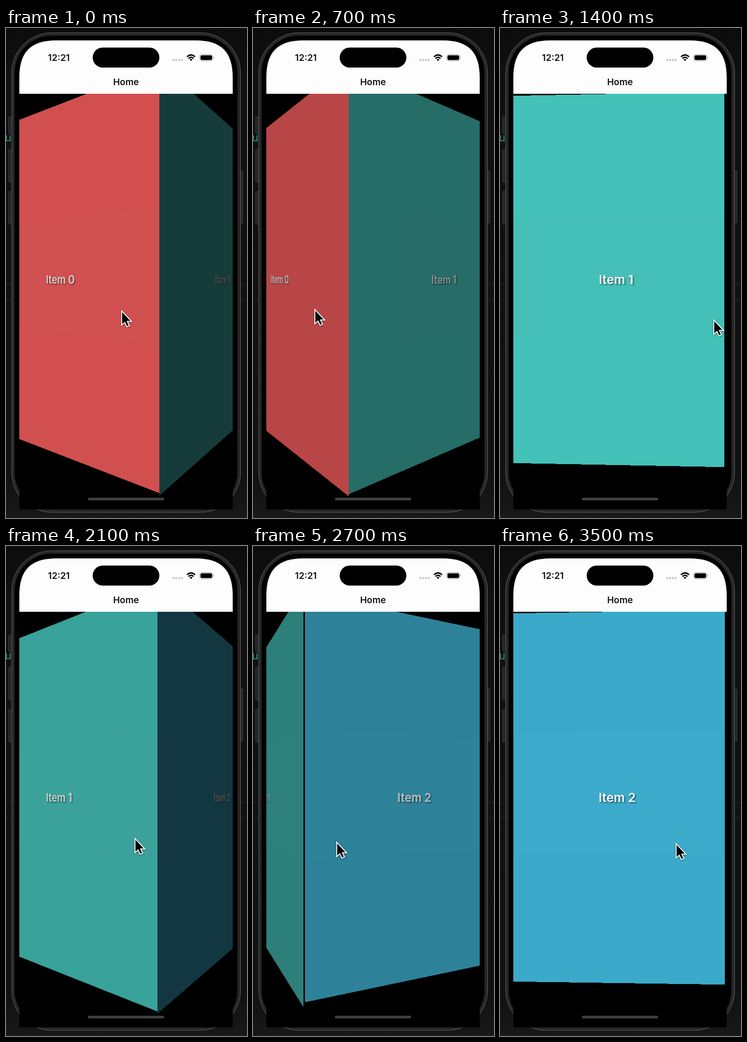
An HTML page that plays this animation: 506x1028 px, repeating every 3600 ms.

```html
<!DOCTYPE html>
<html lang="en">
<head>
<meta charset="utf-8">
<title>Rotating carousel</title>
<style>
  html, body { margin: 0; width: 100%; height: 100%; overflow: hidden; background: #101010; }
  #stage { position: relative; width: 506px; height: 1028px; overflow: hidden; font-family: Inter, sans-serif; }
  svg { position: absolute; left: 0; top: 0; }
  #view {
    position: absolute; left: 28px; top: 137.5px; width: 448px; height: 872px;
    overflow: hidden; background: #000;
    perspective: 448px; perspective-origin: 224px 390px;
  }
  .panel {
    position: absolute; left: -0.4px; top: 0.5px; width: 448.8px; height: 779px;
    display: flex; align-items: center; justify-content: center;
    color: #fff; font-size: 26px; font-weight: 600;
    text-shadow: 2px 2px 3px rgba(0, 0, 0, .55);
  }
</style>
</head>
<body>
<div id="stage">
  <svg width="506" height="1028">
    <defs>
      <linearGradient id="backdrop" x2="0" y2="1">
        <stop stop-color="#0c0c0c"/><stop offset=".1" stop-color="#101010"/>
        <stop offset=".9" stop-color="#111"/><stop offset="1" stop-color="#181818"/>
      </linearGradient>
    </defs>
    <rect width="506" height="1028" fill="url(#backdrop)"/>
    <path d="M0 538H506M0 570H506" stroke="#181818" stroke-width="4"/>
    <text x="-2" y="238" font-family="Roboto, sans-serif" font-size="24" fill="#2b8f84">u</text>
    <g fill="#252525" stroke="#3c3c3c">
      <rect x="5.5" y="186.5" width="12" height="35" rx="2"/>
      <rect x="5.5" y="254.5" width="12" height="69" rx="2"/>
      <rect x="5.5" y="342.5" width="12" height="69" rx="2"/>
      <rect x="486.5" y="299.5" width="11" height="110" rx="2"/>
    </g>
    <rect x="12" y="10" width="480.5" height="1006" rx="84" fill="#262626" stroke="#666"/>
    <rect x="18" y="16" width="468" height="994" rx="78" fill="#000"/>
    <path d="M28 138V104C28 50 52 26 106 26H398C452 26 476 50 476 104V138Z" fill="#fdfdfd"/>
    <rect x="182" y="41" width="140" height="42" rx="21"/>
    <g font-size="19" font-weight="600" text-anchor="middle" fill="#111">
      <text x="111" y="69">12:21</text>
      <text x="252" y="120">Home</text>
    </g>
    <path d="M349 67.3H371" stroke="#c6c6c6" stroke-width="4" stroke-dasharray="4 2"/>
    <g fill="none" stroke="#000" stroke-width="2.7">
      <path d="M380 60.5Q388.500 52.500 397 60.500M383.200 64Q388.500 59 393.800 64"/>
      <path d="M385.500 66.300Q388.500 63.800 391.500 66.300L388.500 69.200Z" fill="#000" stroke="none"/>
    </g>
    <rect x="406.500" y="55.500" width="28" height="13.500" rx="4.500" fill="none" stroke="#999"/>
    <rect x="408.300" y="57.300" width="24.400" height="9.900" rx="3"/>
    <path d="M436 60Q438 62.200 436 64.500Z" fill="#999"/>
  </svg>
  <div id="view"></div>
  <svg width="506" height="1028">
    <rect x="172" y="985.500" width="160" height="5.500" rx="2.700" fill="#414141"/>
    <g id="cursor" style="filter: drop-shadow(0 1px 1.500px rgba(0,0,0,.5))">
      <path d="M.8 1.500V31.500L7.300 25.800L11.800 35L17 32.600L12.800 23.500H21.500Z"
        fill="#000" stroke="#fff" stroke-width="2"/>
    </g>
  </svg>
</div>
<script>
const LOOP = 3600, STEP = 100;
const FACE_ANGLE = 60, ORBIT_X = 388, ORBIT_Z = 354;

// time, carousel position, cursor x, cursor y
const keys = [
  [0, .372, 242, 592], [300, .49, 182, 590], [700, .595, 129, 589],
  [800, .66, 122, 590], [1000, .89, 160, 596], [1100, .96, 260, 602],
  [1200, 1, 370, 607], [1300, 1.01, 440, 610], [1400, 1.021, 448, 611],
  [1600, 1.04, 438, 611], [1800, 1.095, 411, 611], [2100, 1.38, 270, 612],
  [2500, 1.513, 194, 617], [2600, 1.6, 177, 619], [2700, 1.78, 175, 620],
  [2900, 2.011, 175, 620], [3050, 2.05, 190, 620], [3250, 2.025, 300, 622],
  [3400, 2.01, 365, 623], [3500, 2.016, 369, 623]
];

const view = document.getElementById("view");
const cursor = document.getElementById("cursor");
const panels = ["rgb(251,95,95)", "rgb(69,195,186)", "rgb(60,172,204)"].map((color, i) => {
  const panel = document.createElement("div");
  panel.className = "panel";
  panel.textContent = "Item " + i;
  panel.style.background = color;
  return view.appendChild(panel);
});

function sample(t) {
  const next = keys.findIndex(key => key[0] > t);
  if (next < 0) return keys[keys.length - 1];
  const a = keys[next - 1], b = keys[next];
  const k = (t - a[0]) / (b[0] - a[0]);
  return a.map((v, i) => v + (b[i] - v) * k);
}

function placePanel(panel, offset) {
  const dist = Math.abs(offset), angle = offset * FACE_ANGLE * Math.PI / 180;
  const x = ORBIT_X * Math.sin(angle), z = ORBIT_Z * (Math.cos(angle) - 1);
  const style = panel.style;
  style.visibility = dist < 1 ? "visible" : "hidden";
  style.transform = `translate3d(${x}px, 0, ${z}px) rotateY(${angle}rad)`;
  // faces on the right are further from the light
  style.opacity = Math.max(0, 1 - dist * (offset > 0 ? 1.1 : .44));
  style.zIndex = Math.round(dist * 100);
}

function draw(now) {
  const t = Math.floor(now % LOOP / STEP) * STEP;
  const [, position, x, y] = sample(t);
  panels.forEach((panel, i) => placePanel(panel, i - position));
  cursor.setAttribute("transform", `translate(${x} ${y})`);
}

const start = performance.now();
function tick() {
  draw(performance.now() - start);
  requestAnimationFrame(tick);
}
tick();
</script>
</body>
</html>
```
